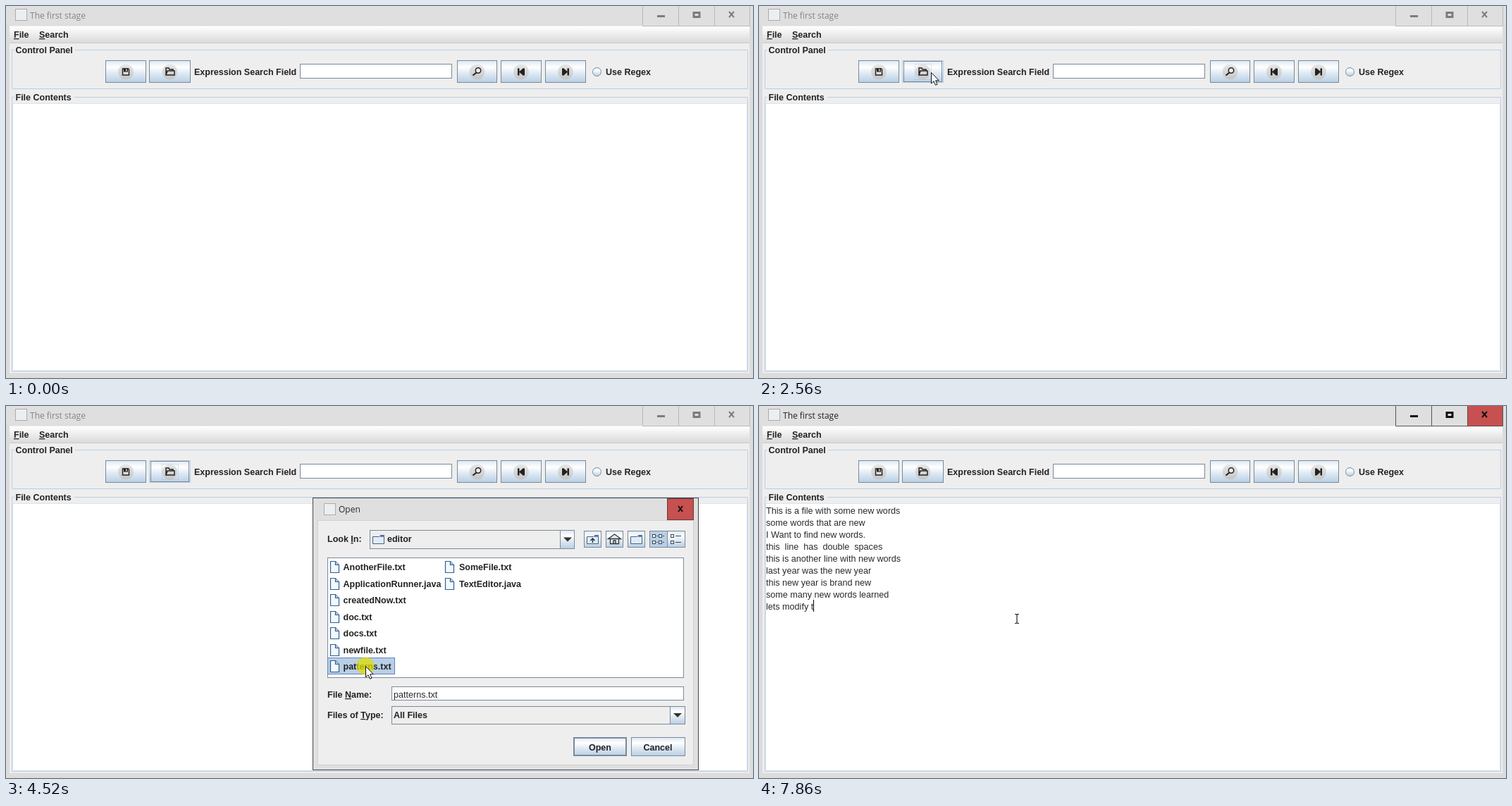
An HTML page for the animation above (8 s loop, 1060 by 528 pixels).

```html
<!DOCTYPE html>
<html lang="en">
<head>
<meta charset="utf-8">
<title>Text editor</title>
<style>
html, body { margin: 0; width: 100%; height: 100%; overflow: hidden; background: #dcdcdc; }
svg { display: block; }
text { font: 12.6px "Liberation Sans", Arial, sans-serif; fill: #2a2a2a; white-space: pre; }
.b { font-weight: bold; font-size: 12.5px; fill: #222; }
.t { font: 12px "Open Sans", sans-serif; }
.m { text-anchor: middle; }
.u { text-decoration: underline; }
</style>
</head>
<body>
<svg id="stage" width="1060" height="528" viewBox="0 0 1060 528">
  <defs>
    <linearGradient id="metal" x2="0" y2="1">
      <stop stop-color="#dde8f3"/><stop offset=".3" stop-color="#fff"/>
      <stop offset=".6" stop-color="#dde8f3"/><stop offset="1" stop-color="#b8cfe5"/>
    </linearGradient>
    <linearGradient id="bar" x2="0" y2="1">
      <stop stop-color="#fff"/><stop offset="1" stop-color="#dadada"/>
    </linearGradient>
    <linearGradient id="disc" x2="0" y2="1">
      <stop stop-color="#e6e6e6"/><stop offset="1" stop-color="#c6c6c6"/>
    </linearGradient>
  </defs>
</svg>
<script>
const stage = document.getElementById('stage');
const STEEL = '#7a8a99', SKY = '#b8cfe5', INK = '#222', RED = '#c75050';

function add(parent, tag, attrs, content = '') {
  const el = document.createElementNS('http://www.w3.org/2000/svg', tag);
  for (const k in attrs) el.setAttribute(k, attrs[k]);
  el.innerHTML = content;
  return parent.appendChild(el);
}
const group = (parent, attrs) => add(parent, 'g', attrs);
const fill = (g, x, y, width, height, color) => add(g, 'rect', {x, y, width, height, fill: color});
const box = (g, x, y, w, h, color, stroke = STEEL) =>
  add(g, 'rect', {x: x + .5, y: y + .5, width: w - 1, height: h - 1, fill: color, stroke});
const line = (g, d, stroke = STEEL, width = 1, color = 'none') =>
  add(g, 'path', {d, stroke, 'stroke-width': width, fill: color});
const shape = (g, d, color = INK) => add(g, 'path', {d, fill: color});
const text = (g, x, y, s, cls = 'b') => add(g, 'text', {x, y, class: cls}, s);
const show = (el, on) => el.setAttribute('visibility', on ? 'inherit' : 'hidden');
const appIcon = (g, x, y) => box(g, x, y, 17, 17, '#eceff1', '#a9adb0');

// Main window
const win = group(stage);
fill(win, 0, 0, 1060, 528, '#dcdcdc');
fill(win, 0, 0, 1060, 28, '#dfdfdf');
fill(win, 5, 28, 1050, 493, '#eee');
appIcon(win, 13, 4);
const title = text(win, 34, 18, 'The first stage', 't');
const closeCell = fill(win, 1005, 0, 51, 28, RED);
const cells = line(win, 'M903.5 0V28.5H1055.5V0M954.5 0V28M1005.5 0V28');
const minimize = fill(win, 924, 13, 11, 3, INK);
const maximize = line(win, 'M976 9.5H984V15.5H976Z', INK, 3);
const closeMark = line(win, 'M1026 8L1033 16M1033 8L1026 16', INK, 2);

fill(win, 5, 29, 1050, 23, 'url(#bar)');
fill(win, 5, 52, 1050, 1, '#ccc');
text(win, 11, 45, '<tspan class="u">F</tspan>ile');
text(win, 47, 45, '<tspan class="u">S</tspan>earch');

line(win, 'M12 62.5H8.5V117.5H1052.5V62.5H98', SKY);
text(win, 13.5, 67, 'Control Panel');
line(win, 'M12 129.5H8.5V518.5H1052.5V129.5H97', SKY);
text(win, 13.5, 134, 'File Contents');
box(win, 9, 138, 1043, 380, '#fff', '#dbe5ef');

function toolButton(x, w) {
  box(win, x, 77, w, 32, 'url(#metal)');
  const cx = x + w / 2;
  add(win, 'circle', {cx, cy: 93.5, r: 10.8, fill: 'url(#disc)'});
  return group(win, {transform: `translate(${cx} 93.5)`});
}
const save = toolButton(141, 58);
line(save, 'M-4.5-4.5H3.5L4.5-3.5V4.5H-4.5Z', INK, 1.5, '#ddd');
fill(save, -3, -5, 6, 5, INK);
fill(save, 0, -4, 1.5, 3, '#ddd');
const folder = toolButton(203, 59);
line(folder, 'M-5.5 4.5V-5.5H-1.5L-.5-3.5H4.5V-1.5M-5.5 4.5L-3.5-1.5H6.5V4.5Z', INK, 1.5);
const find = toolButton(640, 57);
add(find, 'circle', {cx: 1.5, cy: -2, r: 3.7, fill: '#eee', stroke: INK, 'stroke-width': 1.5});
line(find, 'M-1 1L-6 5', INK, 2.2);
for (const [x, dir] of [[702, 1], [765, -1]]) {
  const g = add(toolButton(x, 58), 'g', {transform: `scale(${dir} 1)`});
  shape(g, 'M-5-5H-2.5V-.5L2-4.5V-5H5V5H2V4.5L-2.5.5V5H-5Z');
}
const rollover = group(win);
box(rollover, 203, 77, 59, 32, 'none', SKY);
box(rollover, 205, 78, 55, 30, 'none', STEEL);
const focusRing = box(win, 221, 82, 24, 23, 'none', '#a3b8cc');
focusRing.setAttribute('opacity', .4);

text(win, 267, 98, 'Expression Search Field');
box(win, 417, 82, 216, 21, '#fff');
add(win, 'circle', {cx: 838.5, cy: 93.5, r: 6, fill: 'url(#metal)', stroke: STEEL});
text(win, 851, 98, 'Use Regex');

// Loaded document
const doc = group(win);
const lines = ['This is a file with some new words', 'some words that are new',
  'I Want to find new words.', 'this  line  has  double  spaces',
  'this is another line with new words', 'last year was the new year',
  'this new year is brand new', 'some many new words learned', '']
  .map((s, i) => text(doc, 10, 153 + 17 * i, s, ''));
const caret = fill(doc, 0, 0, 1, 17, '#000');

// File chooser
const dialog = group(stage);
box(dialog, 435, 130, 548, 387, '#dfdfdf', '#484848');
box(dialog, 442, 162, 534, 348, '#eee', '#d2d2d2');
appIcon(dialog, 451, 138);
text(dialog, 472, 151, 'Open', 't');
box(dialog, 938, 131, 38, 31, RED, '#6b3838');
line(dialog, 'M954 142L960 150M960 142L954 150', '#111', 2);

const combo = (x, y, w, h, split) => {
  box(dialog, x, y, w, h, '#eee');
  box(dialog, split, y, x + w - split, h, 'url(#metal)');
  const cx = split + 11, cy = y + h / 2;
  shape(dialog, `M${cx - 6} ${cy - 3}h12l-6 6Z`, '#333');
};
const smallFolder = (x, y, w = 17) => {
  line(dialog, `M${x + .5} ${y + 2.5}h${w - 8}l2-2h5v2V${y + 12.5}h${1 - w}Z`, '#44617f', 1, '#e2ebf4');
  fill(dialog, x + w - 6, y + 1, 5, 2, '#6382bf');
};
text(dialog, 456, 193, 'Look <tspan class="u">I</tspan>n:');
combo(516, 176, 291, 27, 786);
smallFolder(520, 183);
text(dialog, 541, 193, 'editor');
for (const x of [820, 851, 882]) box(dialog, x, 177, 25, 24, 'url(#metal)');
smallFolder(824, 183);
line(dialog, 'M832.5 194V188M829.5 191L832.5 188L835.5 191', '#234', 1.5);
line(dialog, 'M854.5 188.5L863.5 182L872.5 188.5ZM857.5 189V195.5H869.5V189M862 195V191H865V195',
  '#333', 1.3, '#e2ebf4');
smallFolder(886, 183);
box(dialog, 913, 177, 26, 24, SKY);
box(dialog, 938, 177, 26, 24, 'url(#metal)');
for (const y of [182, 191]) {
  for (const x of [917, 926]) {
    box(dialog, x, y, 5, 5, '#fff', '#345');
    fill(dialog, x + 6, y + 2, 2, 1, '#345');
  }
  box(dialog, 943, y, 5, 5, '#fff', '#345');
  fill(dialog, 950, y + 2, 8, 1, '#345');
}

box(dialog, 456, 215, 506, 171, '#fff');
const selection = box(dialog, 456, 357, 96, 24, SKY, '#6382bf');
['AnotherFile.txt', 'ApplicationRunner.java', 'createdNow.txt', 'doc.txt', 'docs.txt',
  'newfile.txt', 'patterns.txt', 'SomeFile.txt', 'TextEditor.java'].forEach((name, i) => {
  const right = i > 6, x = right ? 623 : 460, y = 233 + Math.round((right ? i - 7 : i) * 23.5);
  line(dialog, `M${x + .5} ${y - 12.5}h7l5 5v11h-12Z`, '#2f5f8f', 1.2, '#f4f8fc');
  line(dialog, `M${x + 7.5} ${y - 12.5}v5h5`, '#2f5f8f', 1.2, SKY);
  text(dialog, right ? 643 : 478.5, y, name);
});

text(dialog, 456, 414, 'File <tspan class="u">N</tspan>ame:');
box(dialog, 547, 398, 415, 20, '#fff');
const fileName = text(dialog, 550, 414, 'patterns.txt', '');
const fieldCaret = fill(dialog, 550, 400, 1, 17, '#000');
text(dialog, 456, 443, 'Files of <tspan class="u">T</tspan>ype:');
combo(547, 426, 417, 26, 942);
text(dialog, 550, 443, 'All Files');
box(dialog, 805, 470, 76, 27, 'url(#metal)');
box(dialog, 806, 471, 74, 25, 'none');
text(dialog, 843, 489, 'Open', 'b m');
box(dialog, 887, 470, 77, 27, 'url(#metal)');
text(dialog, 925, 489, 'Cancel', 'b m');

// Pointer
const halo = add(stage, 'circle', {r: 12.5, fill: '#e0dc00', opacity: .75});
const arrow = line(stage, 'M.5.5V16L4 12.7L6.5 18.3L9 17.2L6.6 11.8H11.3Z', '#111', 1, '#fff');
const beam = line(stage, 'M-3-6.5H-1L0-5.5L1-6.5H3M0-5.5V5.5M-3 6.5H-1L0 5.5L1 6.5H3', '#222', 1.2);

// Each entry: time, x, y
const path = [[1400, 140, 307], [1480, 150, 268], [1560, 174, 190], [1640, 204, 100],
  [1700, 225, 48], [1780, 232, 39], [1850, 240, 74], [1930, 244, 94],
  [3020, 258, 92], [3100, 335, 165], [3180, 450, 285], [3270, 521, 354],
  [3340, 526, 370], [3420, 521, 378], [3500, 512, 378], [3590, 506, 376],
  [3730, 508, 373], [3810, 509, 371], [3890, 510, 369], [4670, 512, 369],
  [5070, 480, 350], [5140, 425, 325], [5220, 380, 306], [5290, 366, 302]];

const phrase = 'lets modify t';
// Time and number of characters typed
const typing = [[6520, 1], [6600, 2], [6770, 3], [6920, 5], [7090, 6], [7310, 7], [7390, 8],
  [7460, 9], [7540, 10], [7710, 11], [7790, 12], [7860, 13]];

const latest = (list, t) => list.filter(e => e[0] <= t).pop();
const during = (t, ...spans) => spans.some(([a, b]) => t >= a && t < b);

function drawWindow(t) {
  const active = during(t, [2090, 2560], [4670, 8000]);
  title.style.fill = active ? '#222' : '#858585';
  show(closeCell, active);
  cells.setAttribute('stroke', active ? '#555' : '#b9b9b9');
  const ink = active ? '#111' : '#7c7c7c';
  minimize.setAttribute('fill', ink);
  maximize.setAttribute('stroke', ink);
  closeMark.setAttribute('stroke', ink);
  show(rollover, during(t, [1930, 4670]));
  show(focusRing, during(t, [2090, 5600]));
}

function drawDocument(t) {
  show(doc, t >= 4670);
  const typed = latest(typing, t);
  lines[8].textContent = typed ? phrase.slice(0, typed[1]) : '';
  const row = t < 6210 ? 7 : 8;
  const width = lines[row].textContent ? lines[row].getComputedTextLength() : 0;
  caret.setAttribute('x', Math.round(10 + width));
  caret.setAttribute('y', 139 + 17 * row);
  show(caret, during(t, [5600, 6070], [6210, 8000]));
}

function drawDialog(t) {
  show(dialog, during(t, [2640, 4670]));
  const [, alpha, scale] = latest([[0, .3, .93], [2710, .75, .98], [2790, 1, 1]], t);
  dialog.setAttribute('opacity', alpha);
  dialog.setAttribute('transform', `translate(708 323) scale(${scale}) translate(-708 -323)`);
  show(selection, t >= 4370 && t < 4670);
  show(fileName, t >= 4370 && t < 4670);
  show(fieldCaret, during(t, [2790, 3100], [3590, 4120]));
}

function drawPointer(t) {
  const [, x, y] = latest(path, t) || [0, -50, -50];
  const overText = y > 138 && !during(t, [2640, 4670]);
  const place = `translate(${x} ${y})`;
  arrow.setAttribute('transform', place);
  beam.setAttribute('transform', place);
  halo.setAttribute('transform', place);
  show(arrow, !overText);
  show(beam, overText);
  show(halo, during(t, [2090, 2260], [4370, 4450], [4520, 4670], [5600, 5680]));
}

function frame() {
  const t = performance.now() % 8000;
  drawWindow(t);
  drawDocument(t);
  drawDialog(t);
  drawPointer(t);
  requestAnimationFrame(frame);
}
frame();
</script>
</body>
</html>
```
